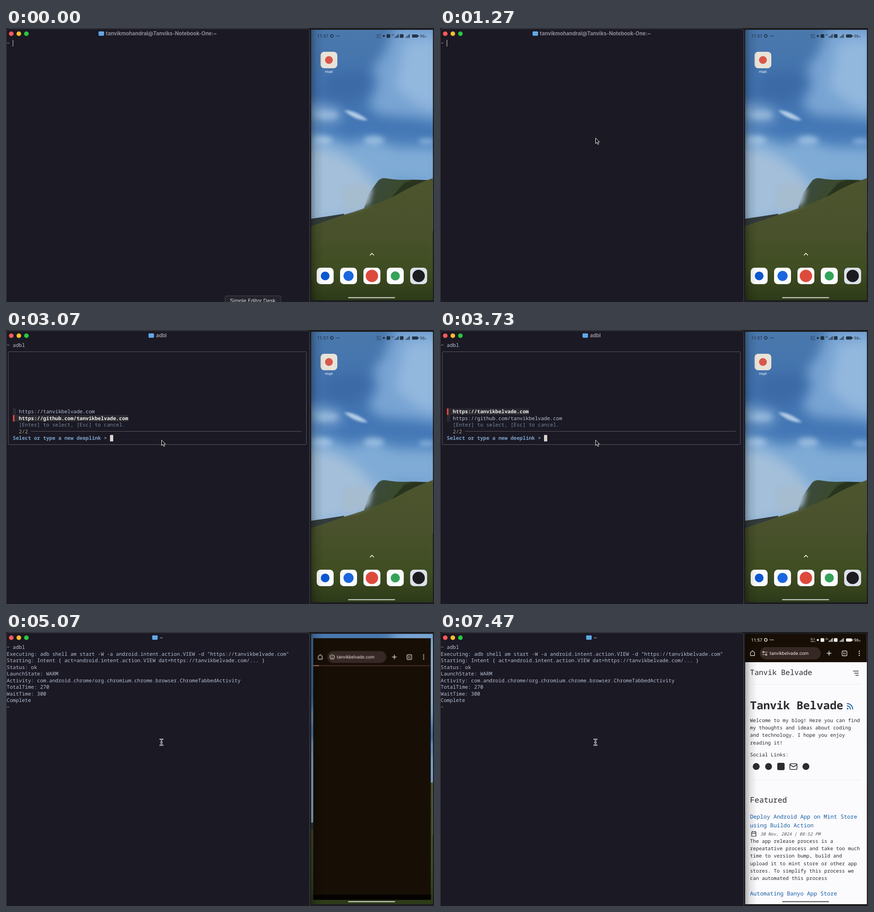
Animation of 934x599 px, one loop 7.54 s. Source, as an HTML page:

```html
<!DOCTYPE html>
<html lang="en">
<head>
<meta charset="utf-8">
<title>Opening a deep link from the terminal</title>
<style>
html, body { margin: 0; width: 100%; height: 100%; overflow: hidden; background: #1d1d20; }
svg { display: block; width: 100vw; height: 100vh; }
text { white-space: pre; text-rendering: geometricPrecision; }
.mono { font-family: "Noto Sans Mono", "DejaVu Sans Mono", monospace; }
.ui { font-family: Roboto, Inter, sans-serif; }
.term { font-size: 11.06px; fill: #b7c1d4; }
.bold { font-weight: 700; }
.line { fill: none; stroke-linecap: round; stroke-linejoin: round; }
.body { font-size: 10.8px; }
.link { font-size: 12.2px; fill: #1660a6; }
.haze { filter: blur(13px); }
.soft { filter: blur(6px); }
.wisp { filter: blur(2.5px); }

.title {
  position: absolute; top: 4px; left: 0; width: 662px; text-align: center;
  font: 700 11.2px/16px Inter, "Open Sans", sans-serif; color: #8d8c97;
}
.title::before {
  content: ""; display: inline-block; width: 12px; height: 10px; margin-right: 4px;
  border-radius: 2px; vertical-align: -1px;
  background: linear-gradient(#3f86c8 20%, #8cc3f2 20% 30%, #5fa6e4 30%);
}

/* Everything runs on one clock; percentages are ms / 75.4. */
.run, .step { animation: 7540ms linear infinite; }
.step { animation-timing-function: step-end; }

.home-title { animation-name: home-title; }
.tool-title { animation-name: tool-title; }
.done-title { animation-name: finished; }
.tip { animation-name: tip; }
.mouse { animation-name: mouse; }
.arrow { animation-name: arrow; }
.ibeam { animation-name: ibeam; }
.typing { animation-name: typing; }
.picker { animation-name: picker; }
.pick-last { animation-name: pick-last; }
.pick-first { animation-name: pick-first; }
.exec { animation-name: ibeam; }
.start { animation-name: start; }
.block { animation-name: block; }
.result { animation-name: finished; }
.prompt { animation-name: prompt; }
.browser { animation-name: open; transform-origin: 798.5px 299.5px; }
.bar { animation-name: load; transform-origin: 666px 66px; }
.blank { animation-name: blank; }
.page { animation-name: page; }
.status { animation-name: status; }
.pill { animation-name: pill; }

@keyframes home-title { 0% { opacity: 1 } 33.1%, 100% { opacity: 0 } }
@keyframes tool-title { 0% { opacity: 0 } 33.1% { opacity: 1 } 63.66%, 100% { opacity: 0 } }
@keyframes finished { 0% { opacity: 0 } 63.66%, 100% { opacity: 1 } }
@keyframes tip { 0%, 4.38% { opacity: 1 } 6.23%, 100% { opacity: 0 } }
@keyframes mouse {
  0%, 4.38% { transform: translate(532px, 612px); animation-timing-function: ease-in-out }
  13.26%, 100% { transform: translate(339px, 240px) }
}
@keyframes arrow { 0% { opacity: 1 } 52.12%, 100% { opacity: 0 } }
@keyframes ibeam { 0% { opacity: 0 } 52.12%, 100% { opacity: 1 } }
@keyframes typing {
  0% { transform: none; opacity: 1 }
  21.22% { transform: translateX(6.64px); opacity: 1 }
  23.21% { transform: translateX(13.27px); opacity: 1 }
  25.2% { transform: translateX(19.91px); opacity: 1 }
  28.25% { transform: translateX(26.8px); opacity: 1 }
  32.76%, 100% { transform: translateX(26.8px); opacity: 0 }
}
@keyframes picker { 0% { opacity: 0 } 34.48% { opacity: 1 } 52.12%, 100% { opacity: 0 } }
@keyframes pick-last { 0% { opacity: 1 } 46.42%, 100% { opacity: 0 } }
@keyframes pick-first { 0% { opacity: 0 } 46.42%, 100% { opacity: 1 } }
@keyframes start { 0% { opacity: 0 } 54.77%, 100% { opacity: 1 } }
@keyframes block {
  0% { opacity: 0; transform: translateY(-14.5px) }
  52.12% { opacity: 1; transform: translateY(-14.5px) }
  54.77% { opacity: 1; transform: none }
  63.66%, 100% { opacity: 0; transform: none }
}
@keyframes prompt {
  0% { opacity: 0; fill: #b8b2b0 }
  65.38% { opacity: 1; fill: #b8b2b0 }
  68.97%, 100% { opacity: 1; fill: #7fb878 }
}
@keyframes open {
  0%, 64.12% { opacity: 0; transform: scale(.85) }
  64.13% { opacity: 1; transform: scale(.85); animation-timing-function: cubic-bezier(.215, .61, .355, 1) }
  72.08%, 100% { opacity: 1; transform: none }
}
@keyframes load {
  0%, 64.13% { transform: scaleX(.04) }
  67.4% { transform: scaleX(.05) }
  72.94% { transform: scaleX(.6) }
  75.99%, 100% { transform: scaleX(1) }
}
@keyframes blank { 0% { opacity: 1 } 75.99%, 100% { opacity: 0 } }
@keyframes page { 0% { opacity: 0 } 75.99%, 100% { opacity: 1 } }
@keyframes status {
  0% { opacity: .85; color: #15202e }
  64.13% { opacity: 0; color: #fff }
  70.29%, 100% { opacity: 1; color: #f1efec }
}
@keyframes pill { 0% { fill: #dededb } 75.99%, 100% { fill: #4b4a4d } }
</style>
</head>
<body>
<svg viewBox="0 0 934 599">
  <defs>
    <clipPath id="screen"><rect x="666" y="4" width="265.5" height="591"/></clipPath>
    <linearGradient id="sky" x2="0" y2="1">
      <stop offset="0" stop-color="#4a78ac"/>
      <stop offset=".3" stop-color="#4273b0"/>
      <stop offset=".5" stop-color="#4478b6"/>
      <stop offset=".75" stop-color="#6a9ccd"/>
      <stop offset="1" stop-color="#8ab0d4"/>
    </linearGradient>
    <linearGradient id="grass" x2="0" y2="1">
      <stop offset="0" stop-color="#4d552f"/>
      <stop offset=".45" stop-color="#48512b"/>
      <stop offset=".75" stop-color="#3f4d22"/>
      <stop offset="1" stop-color="#2d3a18"/>
    </linearGradient>
    <linearGradient id="peak" x2="1" y2=".4">
      <stop offset="0" stop-color="#57696a"/>
      <stop offset=".3" stop-color="#3b4a3a"/>
      <stop offset=".6" stop-color="#3a4a2e"/>
      <stop offset="1" stop-color="#28331f"/>
    </linearGradient>
    <linearGradient id="edge">
      <stop offset="0" stop-opacity=".3"/>
      <stop offset=".4" stop-opacity=".1"/>
      <stop offset="1" stop-opacity="0"/>
    </linearGradient>
    <path id="bars" d="M0 8h1.6v-2h-1.6zM2.5 8h1.6v-4h-1.6zM5 8h1.6v-6h-1.6zM7.5 8h1.6v-8h-1.6z"/>
    <path id="beam" class="line" d="M-3 -5.5H-1.2L.2 -4 1.6 -5.5H3.4M.2 -4V6M-3 7.5H-1.2L.2 6 1.6 7.5H3.4M-1.5 1.5H1.9"/>
  </defs>

  <!-- Phone home screen -->
  <g clip-path="url(#screen)">
    <rect x="666" y="4" width="266" height="440" fill="url(#sky)"/>
    <g class="haze">
      <path d="M850 -10 L950 -10 950 205 890 196 815 190 790 170 812 120 800 90 825 55z" fill="#78a4d3"/>
      <path d="M870 30 L950 20 950 185 895 165 850 130z" fill="#93b8de"/>
      <path d="M650 165 L690 168 735 180 725 208 650 205z" fill="#7fa7d1"/>
      <path d="M700 100 L780 92 800 125 750 165 690 150z" fill="#3c6aa6"/>
      <path d="M650 222 L705 238 750 256 800 240 850 262 950 262 950 340 850 330 800 410 650 440z" fill="#7fabd6"/>
      <path d="M650 260 L715 268 768 300 810 345 790 400 650 430z" fill="#a3bfda"/>
    </g>
    <g class="soft">
      <ellipse cx="700" cy="190" rx="24" ry="8" fill="#93b6da"/>
      <ellipse cx="803" cy="246" rx="22" ry="9" fill="#97bbdf"/>
      <ellipse cx="690" cy="246" rx="22" ry="9" fill="#9dbfe0"/>
      <ellipse cx="918" cy="248" rx="18" ry="6" fill="#86b0da"/>
    </g>
    <path class="wisp" d="M738 180 Q764 180 790 202 Q760 202 738 180z" fill="#b4cde7"/>
    <path d="M666 417 L700 412 738 406 738 440 666 440z" fill="#333c3c"/>
    <path d="M780 398 L791 364 Q800 350 812 334 Q819 326 832 329 Q850 332 866 332 Q890 331 904 332 L902 360 800 410z" fill="url(#peak)"/>
    <path d="M840 372 L868 340 Q884 331 904 332 L932 333 932 350z" fill="#29341f"/>
    <path d="M666 433 Q705 420 742 407 Q800 390 850 366 Q888 343 932 328 L932 596 666 596z" fill="url(#grass)"/>
    <path class="soft" d="M735 345 L785 340 800 352 792 384 770 394 738 401z" fill="#a6bccf"/>

    <g class="ui">
      <rect x="686.5" y="52" width="36.5" height="36" rx="8" fill="#e9e2d8"/>
      <circle cx="704.7" cy="70" r="8.5" fill="#d8574a"/>
      <text x="704.7" y="98.3" font-size="7.2" text-anchor="middle" fill="#fff">Hopli</text>
      <path class="line" d="M794.5 496.5 L798.5 492.5 802.5 496.5" stroke="#fff" stroke-width="1.5"/>
      <g fill="#fbfbfd">
        <rect x="678" y="524" width="37" height="36" rx="8.5"/>
        <rect x="729" y="524" width="37" height="36" rx="8.5"/>
        <rect x="780" y="524" width="37" height="36" rx="8.5"/>
        <rect x="831" y="524" width="37" height="36" rx="8.5"/>
        <rect x="882" y="524" width="37" height="36" rx="8.5" fill="#dce1e9"/>
      </g>
      <circle cx="696.5" cy="542" r="9.5" fill="#0b57d0"/>
      <circle cx="747.5" cy="542" r="11" fill="#1a66df"/>
      <circle cx="798.5" cy="542" r="13.5" fill="#dd4a3c"/>
      <circle cx="849.5" cy="542" r="10" fill="#34a35a"/>
      <circle cx="900.5" cy="542" r="13.5" fill="#1c1c20"/>
    </g>

    <!-- Browser window -->
    <g class="run browser">
      <rect x="666" y="4" width="265.5" height="591" fill="#170f05"/>
      <g class="ui" fill="#ece4df">
        <path class="line" d="M677.5 45 L682 41 686.5 45 V51.5 H677.5z" stroke="#ece4df" stroke-width="1.3"/>
        <rect x="698" y="33" width="133" height="27" rx="13.5" fill="#362824"/>
        <text x="719.3" y="50" font-size="10.2">tanvikbelvade.com</text>
        <path class="line" d="M844.5 46.5h9M849 42v9" stroke="#ece4df" stroke-width="1.5"/>
        <rect class="line" x="877.5" y="41.5" width="10.5" height="10.5" rx="2" stroke="#ece4df" stroke-width="1.3"/>
        <text x="882.8" y="49" font-size="5.8" font-weight="700" text-anchor="middle">51</text>
        <circle cx="915" cy="42" r="1.3"/><circle cx="915" cy="46.5" r="1.3"/><circle cx="915" cy="51" r="1.3"/>
      </g>
      <g class="step blank">
        <circle class="line" cx="709" cy="46.5" r="5" stroke="#ece4df" stroke-width="1.2"/>
        <path class="line" d="M709 46.5v2.5M709 44v.1" stroke="#ece4df" stroke-width="1.3"/>
        <rect x="666" y="65.2" width="265.5" height="1.8" fill="#4d362e"/>
        <rect class="run bar" x="666" y="65.2" width="265.5" height="1.8" fill="#d68877"/>
        <rect x="666" y="583.5" width="265.5" height="11.5" fill="#050301"/>
      </g>
      <g class="step page">
        <g class="line" stroke="#ece4df" stroke-width="1.2">
          <path d="M709 44h5M704 49.5h4"/>
          <circle cx="705.7" cy="44" r="1.6"/><circle cx="711.8" cy="49.5" r="1.6"/>
        </g>
        <rect x="666" y="66" width="265.5" height="529" fill="#fbfafd"/>
        <path d="M677 114.5H917M677 324H917" stroke="#eeebf1"/>
        <path class="line" d="M902 85.5h11M904.5 90h8.5M907 94.5h6" stroke="#333" stroke-width="1.4"/>
        <g class="mono" fill="#2b2b30">
          <text x="676.5" y="93.8" font-size="16.15">Tanvik Belvade</text>
          <text class="bold" x="676.5" y="168.5" font-size="24.2">Tanvik Belvade</text>
          <text class="body" y="197">
            <tspan x="676.5">Welcome to my blog! Here you can find</tspan>
            <tspan x="676.5" dy="16.2">my thoughts and ideas about coding</tspan>
            <tspan x="676.5" dy="16.2">and technology. I hope you enjoy</tspan>
            <tspan x="676.5" dy="16.2">reading it!</tspan>
          </text>
          <text class="body" x="676.5" y="272">Social Links:</text>
          <text x="676.5" y="373" font-size="16.8">Featured</text>
          <text class="link" y="408">
            <tspan x="676.5">Deploy Android App on Mint Store</tspan>
            <tspan x="676.5" dy="19">using Buildo Action</tspan>
          </text>
          <text x="699" y="445" font-size="9.5" font-style="italic" fill="#55545a">30 Nov, 2024 | 08:52 PM</text>
          <text class="body" y="461">
            <tspan x="676.5">The app release process is a</tspan>
            <tspan x="676.5" dy="16.2">repeatative process and take too much</tspan>
            <tspan x="676.5" dy="16.2">time to version bump, build and</tspan>
            <tspan x="676.5" dy="16.2">upload it to mint store or other app</tspan>
            <tspan x="676.5" dy="16.2">stores. To simplify this process we</tspan>
            <tspan x="676.5" dy="16.2">can automated this process</tspan>
          </text>
          <text class="link" x="676.5" y="576">Automating Banyo App Store</text>
        </g>
        <g class="line" stroke="#1660a6" stroke-width="1.9">
          <path d="M888.5 156.5a12 12 0 0 1 12 12M888.5 161.5a7 7 0 0 1 7 7"/>
          <circle cx="889.5" cy="167.5" r=".8"/>
        </g>
        <g fill="#2b2b30">
          <circle cx="690" cy="294" r="7.5"/>
          <circle cx="717" cy="294" r="7.5"/>
          <rect x="736" y="286" width="16" height="16" rx="3"/>
          <circle cx="798.5" cy="294" r="7.5"/>
        </g>
        <g class="line" stroke="#2b2b30" stroke-width="1.6">
          <rect x="763.5" y="288" width="15.5" height="12.5" rx="2"/>
          <path d="M763.8 290 L771.2 295 778.7 290"/>
          <path d="M680 437h9.5v9.5h-9.5zM680 440.5h9.5M682.3 435.5v2.5M687.2 435.5v2.5" stroke-width="1.2"/>
        </g>
      </g>
    </g>

    <g class="ui step status" fill="currentColor">
      <text x="679" y="21" font-size="9.7">11:57</text>
      <circle class="line" cx="711" cy="17.3" r="3" stroke="currentColor" stroke-width="1.4"/>
      <circle cx="720.5" cy="17.3" r="1"/><circle cx="723.8" cy="17.3" r="1"/><circle cx="727" cy="17.3" r="1"/>
      <text x="808.5" y="17" font-size="5">60.6</text>
      <text x="809" y="21.5" font-size="4.6">KB/s</text>
      <circle cx="824.5" cy="17.5" r="2.3"/>
      <rect x="830.5" y="13.5" width="8" height="8" rx="1.5"/>
      <text x="841" y="17" font-size="5">5G</text>
      <use href="#bars" x="848" y="13.5"/>
      <rect x="859.5" y="13.5" width="8" height="8" rx="1.5"/>
      <use href="#bars" x="872" y="13.5"/>
      <rect x="886" y="14" width="13" height="7" rx="2"/>
      <rect x="899.5" y="16" width="1.6" height="3"/>
      <text x="903.5" y="21" font-size="9.4">96<tspan font-size="5.5">%</tspan></text>
    </g>
    <rect class="step pill" x="746.5" y="588.5" width="102.5" height="2" rx="1"/>
    <rect x="666" y="4" width="26" height="591" fill="url(#edge)"/>
  </g>

  <!-- Terminal -->
  <path d="M.5 599 V8 Q.5 1.5 7 1.5 H656 Q662.5 1.5 662.5 8 V599" fill="#1b1924" stroke="#48474f"/>
  <circle cx="11.5" cy="12.5" r="5" fill="#fc5b57"/>
  <circle cx="28" cy="12.5" r="5" fill="#fdbc2e"/>
  <circle cx="44.5" cy="12.5" r="5" fill="#28c840"/>

  <g class="mono term">
    <text x="1.5" y="37.3"><tspan fill="#b8b2b0">~</tspan> adbl</text>
    <g class="step typing">
      <rect x="14.5" y="25" width="34" height="16" fill="#1b1924"/>
      <rect x="14.6" y="26" width="1.1" height="14.5" fill="#d0cbc8"/>
    </g>

    <g class="step picker">
      <rect class="line" x="5" y="47.5" width="650.5" height="203" rx="2" stroke="#5a5963"/>
      <rect x="15" y="171" width="7" height="29" fill="#2b2931"/>
      <g class="step pick-last">
        <rect x="15" y="186" width="252" height="14" fill="#2b2931"/>
        <rect x="15" y="186" width="3.5" height="14" fill="#e0453f"/>
        <text x="28" y="182.3">https://tanvikbelvade.com</text>
        <text class="bold" x="28" y="196.8" fill="#efede8">https://github.com/tanvikbelvade.com</text>
      </g>
      <g class="step pick-first">
        <rect x="15" y="171.5" width="179" height="14" fill="#2b2931"/>
        <rect x="15" y="171.5" width="3.5" height="14" fill="#e0453f"/>
        <text class="bold" x="28" y="182.3" fill="#efede8">https://tanvikbelvade.com</text>
        <text x="28" y="196.8">https://github.com/tanvikbelvade.com</text>
      </g>
      <text x="28" y="211.3" fill="#73899b">[Enter] to select, [Esc] to cancel.</text>
      <text x="28" y="225.8" fill="#aaa58f">2/2</text>
      <path d="M54.5 221.5H645" stroke="#5a5963"/>
      <text class="bold" x="14.8" y="240.3" fill="#7ba3cb">Select or type a new deeplink &gt; </text>
      <rect x="227" y="229.5" width="7" height="14" fill="#dcd4cf"/>
    </g>

    <text class="step exec" x="1.5" y="51.8">Executing: adb shell am start -W -a android.intent.action.VIEW -d "https://tanvikbelvade.com"</text>
    <text class="step start" x="1.5" y="66.3">Starting: Intent { act=android.intent.action.VIEW dat=https://tanvikbelvade.com/... }</text>
    <rect class="step block" x="1.5" y="69.5" width="6.8" height="14" fill="#e0d8d3"/>
    <text class="step result" y="80.8">
      <tspan x="1.5">Status: ok</tspan>
      <tspan x="1.5" dy="14.5">LaunchState: WARM</tspan>
      <tspan x="1.5" dy="14.5">Activity: com.android.chrome/org.chromium.chrome.browser.ChromeTabbedActivity</tspan>
      <tspan x="1.5" dy="14.5">TotalTime: 270</tspan>
      <tspan x="1.5" dy="14.5">WaitTime: 300</tspan>
      <tspan x="1.5" dy="14.5">Complete</tspan>
    </text>
    <text class="step prompt" x="1.5" y="167.8">~</text>
  </g>

  <g class="run tip">
    <rect x="478" y="585.5" width="122" height="24" rx="2" fill="#25232c" stroke="#45434b"/>
    <text x="538.5" y="599.5" font-family="Inter, sans-serif" font-size="11.2" text-anchor="middle" fill="#e0dfe3">Simple Editor Desk</text>
  </g>

  <g class="run mouse">
    <path class="step arrow" d="M.5 .5 V12.6 L3.3 10 5.3 14.6 7.4 13.7 5.5 9.2 H9z" fill="#111" stroke="#f2f2f2" stroke-linejoin="round"/>
    <g class="step ibeam">
      <use href="#beam" stroke="#f2f2f2" stroke-width="2.4"/>
      <use href="#beam" stroke="#17161c" stroke-width=".8"/>
    </g>
  </g>
</svg>
<div class="title step home-title">tanvikmohandral@Tanviks-Notebook-One:~</div>
<div class="title step tool-title">adbl</div>
<div class="title step done-title">~</div>
</body>
</html>
```
